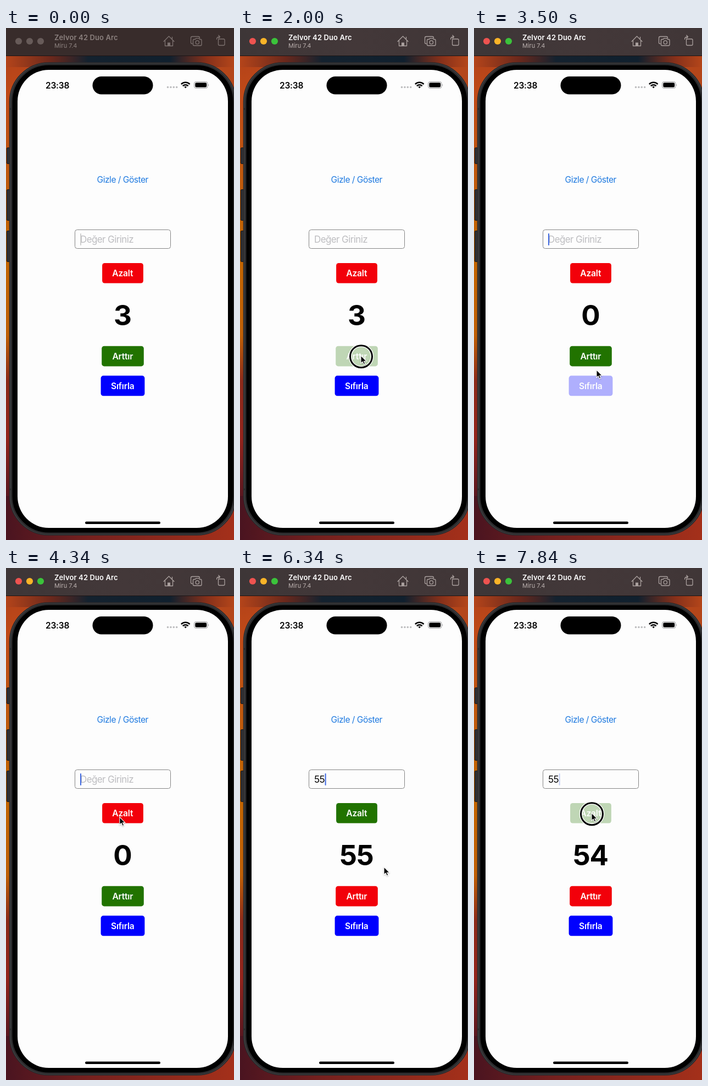
Write an HTML page that moves like this. It is 415x930 px and loops after 8000 ms.

```html
<!DOCTYPE html>
<html lang="tr">
<head>
<meta charset="utf-8">
<title>Counter demo</title>
<style>
  html, body { margin: 0; width: 100%; height: 100%; overflow: hidden; background: #000; }
  svg { display: block; width: 100vw; height: 100vh; }
  text { font-family: Inter, Roboto, sans-serif; }
  .mid { text-anchor: middle; }
  .btn text { font-size: 15.6px; font-weight: 600; letter-spacing: -.2px; fill: #fff; }
  .field { font-size: 17px; letter-spacing: -.6px; }
  .menu text { font-size: 12.2px; letter-spacing: -.1px; fill: #111; }
</style>
</head>
<body>
<svg viewBox="0 0 415 930" preserveAspectRatio="none">
  <defs>
    <linearGradient id="side" x2="0" y2="1">
      <stop offset="0" stop-color="#a83c1a"/>
      <stop offset=".13" stop-color="#c04a18"/>
      <stop offset=".3" stop-color="#c05a0c"/>
      <stop offset=".42" stop-color="#c46600"/>
      <stop offset=".6" stop-color="#c06006"/>
      <stop offset=".69" stop-color="#8c2a1a"/>
      <stop offset=".8" stop-color="#94241c"/>
      <stop offset=".91" stop-color="#5c1820"/>
      <stop offset="1" stop-color="#4a1420"/>
    </linearGradient>
    <linearGradient id="top">
      <stop offset="0" stop-color="#b4441a"/>
      <stop offset=".2" stop-color="#6a281c"/>
      <stop offset=".36" stop-color="#14222f"/>
      <stop offset=".72" stop-color="#10202e"/>
      <stop offset=".88" stop-color="#86301a"/>
      <stop offset="1" stop-color="#b4461a"/>
    </linearGradient>
    <linearGradient id="base">
      <stop offset="0" stop-color="#4a1420"/>
      <stop offset=".35" stop-color="#74201e"/>
      <stop offset="1" stop-color="#a4301a"/>
    </linearGradient>
    <linearGradient id="bar">
      <stop offset="0" stop-color="#3d3637"/>
      <stop offset=".5" stop-color="#433839"/>
      <stop offset="1" stop-color="#403637"/>
    </linearGradient>
    <filter id="soft" x="-30%" y="-60%" width="160%" height="240%">
      <feDropShadow dx="0" dy="3" stdDeviation="6" flood-color="#000" flood-opacity=".2"/>
    </filter>
    <filter id="drop" x="-50%" y="-50%" width="200%" height="200%">
      <feDropShadow dx="0" dy="1" stdDeviation="1" flood-color="#000" flood-opacity=".3"/>
    </filter>
  </defs>

  <!-- wallpaper -->
  <rect width="415" height="930" fill="url(#side)"/>
  <rect x="340" y="51" width="75" height="100" fill="#b4461a"/>
  <rect y="51" width="415" height="20" fill="url(#top)"/>
  <rect y="850" width="415" height="80" fill="url(#base)"/>

  <!-- title bar -->
  <rect id="barBg" width="415" height="51"/>
  <path d="M0 50.5H415" stroke="#1c1515"/>
  <g id="lights"></g>
  <text id="device" x="88" y="22" font-size="13" font-weight="600" letter-spacing=".1">Zelvor 42 Duo Arc</text>
  <text id="system" x="88" y="36" font-size="11">Miru 7.4</text>
  <g id="tools" fill="none" stroke-width="1.3" stroke-linejoin="round" stroke-linecap="round">
    <path d="M287 24.5L296.5 15L306 24.5M289.5 23V32.5H303.5V23M302.5 20V16.5"/>
    <path d="M296.500 26.500V32" stroke-width="5" stroke-linecap="butt"/>
    <path d="M339 28.5H338.5Q336.5 28.5 336.5 26.5V18Q336.5 15.5 339 15.5H350Q352.5 15.5 352.5 18"/>
    <path d="M342.5 20.5H344.5L346 18.8H351L352.5 20.5H354Q356 20.5 356 22.5V30Q356 32 354 32H342.5Q340.5 32 340.5 30V22.5Q340.5 20.5 342.5 20.5Z"/>
    <circle cx="348.3" cy="26" r="3.2"/>
    <rect x="386.5" y="20" width="11.5" height="11.5" rx="2"/>
    <path d="M383.5 20.5Q383.5 16 389 16M386.8 13.3L389.5 16L386.8 18.7"/>
  </g>

  <!-- phone -->
  <g fill="#303034" stroke="#18181a">
    <rect x="1.5" y="217.5" width="8" height="29" rx="1.5"/>
    <rect x="1.5" y="293.5" width="8" height="56" rx="1.5"/>
    <rect x="1.5" y="368.5" width="8" height="56" rx="1.5"/>
  </g>
  <rect x="6.5" y="63" width="412" height="858" rx="71" fill="#444446" stroke="#29292b" stroke-width="1.5"/>
  <rect x="10" y="66" width="405" height="852" rx="68" fill="#000" stroke="#2b2b2d" stroke-width="3"/>
  <path d="M6 147H11M6 838H11" stroke="#2a2a2c" stroke-width="3"/>
  <rect x="21" y="76" width="383" height="832" rx="57" fill="#fdfdfd"/>
  <rect x="157.5" y="88" width="110" height="32.5" rx="16.2"/>
  <rect x="144" y="896.5" width="137" height="4.5" rx="2.2"/>

  <!-- status bar -->
  <text x="72" y="109.5" font-size="15.5" font-weight="600" letter-spacing="-.2">23:38</text>
  <path d="M294.5 107.5H311" stroke="#bdbdbf" stroke-width="3.6" stroke-linecap="round" stroke-dasharray="0 5.4"/>
  <g fill="none" stroke="#000" stroke-width="2.5">
    <path d="M318.9 102.2A10.8 10.8 0 0 1 334.5 102.2M321.8 105.3A6.8 6.8 0 0 1 331.6 105.3"/>
    <path d="M324.3 106.8Q326.7 105 329.1 106.8L326.7 109.5Z" fill="#000" stroke="none"/>
  </g>
  <rect x="342.5" y="97.5" width="24.5" height="12" rx="3.6" fill="none" stroke="#9c9c9e"/>
  <rect x="344.3" y="99.3" width="20.9" height="8.4" rx="2.2"/>
  <path d="M368.3 101.5Q370 103.5 368.3 105.5Z" fill="#9c9c9e"/>

  <!-- app -->
  <text class="mid" x="212.3" y="281" font-size="15.6" letter-spacing="-.5" fill="#1f7ae0">Gizle / Göster</text>
  <rect x="125.5" y="366.5" width="174" height="34" rx="4" fill="none" stroke="#858585"/>
  <text id="entry" class="field" x="135" y="390"></text>
  <rect id="caret" y="373" width="2" height="22" rx="1"/>
  <g id="buttons"></g>
  <text id="count" class="mid" x="212" y="540" font-size="51" font-weight="700" letter-spacing="-1"></text>

  <g id="menu" class="menu">
    <path filter="url(#soft)" fill="#f6f6f6" d="M81 328H191Q199 328 199 336V353Q199 361 191 361H142L136 367L130 361H81Q73 361 73 353V336Q73 328 81 328Z"/>
    <path d="M131.5 328V361" stroke="#dcdcdc"/>
    <text class="mid" x="101.5" y="348.5">Paste</text>
    <text class="mid" x="165" y="348.5">Fit Text</text>
  </g>

  <g id="ring" fill="none">
    <circle r="20" stroke="#fff" stroke-width="5.5"/>
    <circle r="20" stroke="#000" stroke-width="3"/>
  </g>
  <path id="pointer" d="M0 0V14L3.2 11.1L5.4 16L7.8 15L5.7 10.2H10Z" stroke="#fff" stroke-width="1.1" filter="url(#drop)"/>
</svg>

<script>
const LOOP = 8000, FPS = 6;
const RED = '#f2000a', GREEN = '#217300', BLUE = '#0000fe';
const $ = id => document.getElementById(id);

function add(parent, tag, attrs, text) {
  const el = document.createElementNS(parent.namespaceURI, tag);
  for (const key in attrs) el.setAttribute(key, attrs[key]);
  if (text) el.textContent = text;
  return parent.appendChild(el);
}

function makeButton(label, y, width) {
  const g = add($('buttons'), 'g', { class: 'btn' });
  const box = add(g, 'rect', { x: 212.5 - width / 2, y, width, height: 36.7, rx: 4.5 });
  add(g, 'text', { class: 'mid', x: 212.3, y: y + 24 }, label);
  return { g, box };
}

const buttons = {
  dec: makeButton('Azalt', 426.9, 74.8),
  inc: makeButton('Arttır', 577.7, 76.6),
  reset: makeButton('Sıfırla', 631.6, 79.8)
};
const lights = ['#ee5350', '#fab428', '#3bc33b'].map((color, i) => ({
  color, el: add($('lights'), 'circle', { cx: 23 + 20 * i, cy: 24, r: 6.1 })
}));

// All times below are in steps of 1/6 s.
const ACTIVE_FROM = 8;
const path = [
  [3, -20, 590], [7, 183, 444], [8, 206, 447], [10, 220, 595], [16, 220, 595],
  [18, 222, 648], [20, 222, 648], [21, 223, 621], [25, 212, 470], [30, 186, 382],
  [34, 186, 382], [38, 262, 543], [40, 222, 597], [41, 222, 597], [43, 214, 445], [48, 214, 445]
];
const counts = [[0, 3], [13, 4], [15, 5], [21, 0], [35, 5], [36, 55], [41, 56], [44, 55], [46, 54]];
const entries = [[0, ''], [35, '5'], [36, '55']];
const clicks = [8, 12, 14, 15, 20, 30, 40, 43, 45, 47];
const dims = [
  [12, 'inc', .28], [13, 'inc', .65], [14, 'inc', .28], [15, 'inc', .65],
  [20, 'reset', .65], [21, 'reset', .3], [22, 'reset', .8],
  [40, 'inc', .28], [41, 'inc', .65],
  [43, 'dec', .28], [44, 'dec', .65], [45, 'dec', .28], [46, 'dec', .65], [47, 'dec', .28]
];

const latest = (list, n) => list.filter(([at]) => at <= n).pop()[1];

function pointerAt(n) {
  const i = path.findIndex(([at]) => at > n);
  if (i < 1) return [-20, 590];
  const [t0, x0, y0] = path[i - 1], [t1, x1, y1] = path[i];
  const k = (n - t0) / (t1 - t0);
  return [x0 + (x1 - x0) * k, y0 + (y1 - y0) * k];
}

function caretAlpha(n) {
  if (n < ACTIVE_FROM) return n < 3 ? 1 : n === 3 ? .3 : 0;
  if (n >= 30 && n <= 38) return 1;
  return [1, 1, 1, .3, 0, 0][(n + 4) % 6];
}

function setFill(id, color) { $(id).setAttribute('fill', color); }

function drawWindow(active) {
  setFill('barBg', active ? 'url(#bar)' : '#382c2b');
  setFill('device', active ? '#fff' : '#8b807e');
  setFill('system', active ? '#b9afad' : '#8b807e');
  $('tools').setAttribute('stroke', active ? '#aaa09e' : '#7d7270');
  for (const { el, color } of lights) el.setAttribute('fill', active ? color : '#675b59');
}

function drawApp(n, active) {
  const count = latest(counts, n), entry = latest(entries, n);
  const high = count > 10;
  $('count').textContent = count;
  $('entry').textContent = entry || 'Değer Giriniz';
  setFill('entry', entry ? '#000' : '#bdbdc0');

  $('caret').setAttribute('x', 135 + 9.8 * entry.length);
  $('caret').setAttribute('opacity', caretAlpha(n));
  setFill('caret', active ? '#3f68e0' : '#cfcfcf');

  buttons.dec.box.setAttribute('fill', high ? GREEN : RED);
  buttons.inc.box.setAttribute('fill', high ? RED : GREEN);
  buttons.reset.box.setAttribute('fill', BLUE);
  for (const name in buttons) {
    const dim = dims.find(([at, who]) => at === n && who === name);
    buttons[name].g.setAttribute('opacity', dim ? dim[2] : 1);
  }
  $('menu').setAttribute('visibility', n >= 31 && n <= 33 ? 'visible' : 'hidden');
}

function drawPointer(n) {
  const [x, y] = pointerAt(n);
  $('pointer').setAttribute('transform', `translate(${x} ${y})`);
  $('ring').setAttribute('transform', `translate(${x + .5} ${y + 1.7})`);
  $('ring').setAttribute('visibility', clicks.includes(n) ? 'visible' : 'hidden');
}

function render(ms) {
  const n = Math.floor((ms % LOOP) * FPS / 1000);
  const active = n >= ACTIVE_FROM;
  drawWindow(active);
  drawApp(n, active);
  drawPointer(n);
}

let start;
function tick(now) {
  start ??= now;
  render(Math.max(0, now - start));
  requestAnimationFrame(tick);
}
render(0);
requestAnimationFrame(tick);
</script>
</body>
</html>
```
